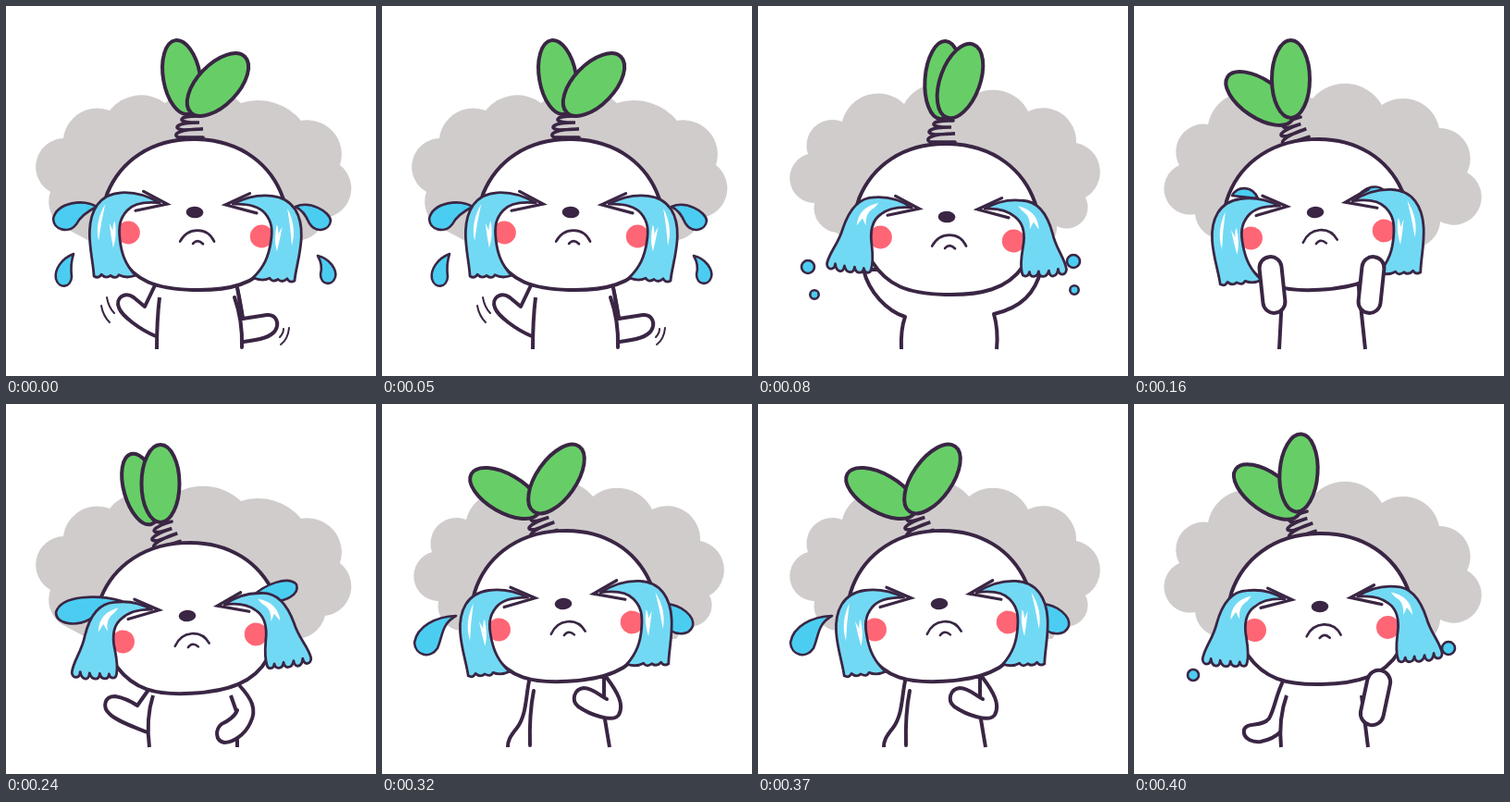
Recreate the animation shown at these times as an HTML page without scripts. Size 400 px wide and 400 px high, loop 0.48 s.

```html
<!DOCTYPE html>
<html lang="en">
<head>
<meta charset="utf-8">
<title>Crying sprout</title>
<style>
html, body { margin: 0; width: 100%; height: 100%; overflow: hidden; background: #fff; }
svg { display: block; width: 100vw; height: 100vh; }
.pose { visibility: hidden; animation: show 480ms step-end infinite; animation-delay: calc(var(--i) * 80ms - 480ms); }
@keyframes show { 0% { visibility: visible; } 16.666%, 100% { visibility: hidden; } }
.ink { fill: #fff; stroke: #3a2644; stroke-width: 4; stroke-linejoin: round; }
.arm { stroke-linecap: round; }
.line { fill: none; stroke: #3a2644; stroke-width: 2.6; stroke-linecap: round; }
.thick { stroke-width: 4; }
.thin { stroke-width: 2; }
.leaf { fill: #67ce67; stroke: #3a2644; stroke-width: 4; }
.drop { fill: #4bcdf2; stroke: #3a2644; stroke-width: 2.6; stroke-linejoin: round; }
.tear { fill: #72d9f4; stroke: #3a2644; stroke-width: 2.8; stroke-linejoin: round; }
.eye { fill: none; stroke: #3a2644; stroke-width: 3.2; stroke-linecap: round; stroke-miterlimit: 10; }
.shine, .body { fill: #fff; }
.cloud { fill: #d0cccc; }
.cheek { fill: #ff6675; }
.nose { fill: #3a2644; }
</style>
</head>
<body>
<svg viewBox="0 0 400 400">
<defs>
  <path id="cloudA" class="cloud" d="M60 238A32 32 0 0 1 48 201A31 31 0 0 1 62 143A37 37 0 0 1 112 113A43 43 0 0 1 172 105A60 60 0 0 1 254 105A60 60 0 0 1 319 124A37 37 0 0 1 361 172A32 32 0 0 1 345 229A34 34 0 0 1 308 254H90Z"/>
  <path id="cloudB" class="cloud" d="M85 245A27 27 0 0 1 61 213A27 27 0 0 1 54 160A28 28 0 0 1 91 125A40 40 0 0 1 158 106A42 42 0 0 1 228 100A42 42 0 0 1 292 114A36 36 0 0 1 344 148A32 32 0 0 1 354 207A23 23 0 0 1 323 238Q324 246 318 254H95Z"/>
  <path id="cloudC" class="cloud" d="M92 252A30 30 0 0 1 66 225A28 28 0 0 1 49 172A30 30 0 0 1 80 128A43 43 0 0 1 150 103A44 44 0 0 1 193 100A46 46 0 0 1 268 107A40 40 0 0 1 330 132A33 33 0 0 1 360 180A30 30 0 0 1 331 233Q330 250 312 260H100Z"/>

  <path id="spring" class="line" style="stroke-width:3.6" d="M11-11C-16-12-14-4 0-4H9C-18-4-20 3-8 4L13 3C-14 3-20 9-14 12H13"/>

  <!-- Head parts are centred on the nose -->
  <g id="head">
    <path class="ink" d="M0-79C50-79 82-52 95-18C104 5 97 34 84 51C68 76 40 84 0 84S-62 76-79 51C-92 34-104 5-95-18C-82-52-50-79 0-79Z"/>
    <circle class="cheek" cx="-71" cy="24" r="12.5"/>
    <circle class="cheek" cx="73" cy="24" r="12.5"/>
    <ellipse class="nose" rx="9.3" ry="6.3"/>
    <path class="line" d="M-15 32C-7 16 14 15 22 31M-1 34Q4 28 10 34"/>
  </g>

  <path id="eye" class="eye" d="M-56-21L-30-8-64 0"/>
  <g id="pour">
    <path class="tear" d="M-38-9C-52-17-68-20-80-19C-104-17-113 2-113 24C-113 42-108 58-107 72q5 3 8-2q5 5 10 1q6 4 9-1q8 4 18 0C-74 58-78 46-80 32C-82 18-81 9-73 0C-66-8-52-10-38-9Z"/>
    <path class="shine" d="M-92 14Q-90 28-87 41Q-83 28-86 12Q-88 15-88 22ZM-97-6Q-108 14-103 34Q-101 14-97-6Z"/>
    <use href="#eye"/>
  </g>
  <g id="flare">
    <path class="tear" d="M-38-9C-52-18-66-20-78-19C-96-19-106-4-112 16C-116 32-126 42-128 54c0 7 8 8 9 0c1 9 9 11 10 2c2 8 10 9 11 1c1 7 9 8 10 1c1 6 7 6 8 1C-77 48-80 36-81 26C-82 12-78 4-71-1C-64-7-52-10-38-9Z"/>
    <path class="shine" d="M-97 12C-96-2-88-10-74-13L-78-8C-84-4-88 0-87 12L-91 4Z"/>
    <use href="#eye"/>
  </g>
  <g id="pours"><use href="#pour"/><use href="#pour" transform="matrix(-1 0 0 1 3 -1)"/></g>
  <g id="flares"><use href="#flare"/><use href="#flare" transform="matrix(-1 0 0 1 3 -1)"/></g>
</defs>

<g class="pose" style="--i:0">
  <use href="#cloudA"/>
  <path class="ink arm" d="M161 302L150 325 138 315C128 308 118 316 122 326C125 335 145 350 162 357"/>
  <path class="ink arm" d="M250 305Q253 318 256 338L282 334C292 333 296 343 291 351C286 358 275 361 257 363"/>
  <path class="body" d="M166 295H248L256 371H163Z"/>
  <path class="ink" fill="none" d="M166 315Q163 340 163 371"/>
  <path class="line thick" d="M247 315Q256 340 255 369M250 305L256 338"/>
  <path class="line thin" d="M103 324Q105 335 112 342M109 315Q111 326 117 332M306 348Q305 360 297 366M300 349Q300 354 296 358"/>
  <use href="#spring" x="200" y="130"/>
  <ellipse class="leaf" rx="20" ry="40.5" transform="translate(190 77) rotate(-10)"/>
  <ellipse class="leaf" rx="22" ry="42" transform="translate(229 85) rotate(44)"/>
  <use href="#head" transform="translate(204 223) rotate(1.6)"/>
  <g class="drop">
    <path d="M98 217C85 208 55 212 51 230C52 243 68 246 76 236C80 228 88 222 98 217Z"/>
    <path d="M313 217C328 210 350 222 351 232C350 243 335 246 328 235Q322 221 313 217Z"/>
    <path d="M73 268C60 273 52 285 54 295C57 306 70 305 71 293C70 285 70 277 73 268Z"/>
    <path d="M337 270C350 273 358 285 356 293C353 303 340 302 340 290C342 283 341 277 337 270Z"/>
  </g>
  <use href="#pours" transform="translate(204 223) rotate(1.6)"/>
</g>

<g class="pose" style="--i:1">
  <use href="#cloudB"/>
  <path class="ink" d="M155 371Q154 350 159 336C140 330 120 310 114 285H306C300 310 285 326 255 333Q260 350 258 371"/>
  <use href="#spring" x="200" y="135"/>
  <ellipse class="leaf" rx="19.5" ry="42" transform="translate(200 80) rotate(4)"/>
  <ellipse class="leaf" rx="21.5" ry="42" transform="translate(218.5 81) rotate(20)"/>
  <use href="#head" transform="translate(204 228) rotate(1.6)"/>
  <use href="#flares" transform="translate(204 228) rotate(1.6)"/>
  <g class="drop">
    <circle cx="54" cy="282" r="7"/><circle cx="61" cy="312" r="4.7"/>
    <circle cx="341" cy="276" r="7"/><circle cx="342" cy="307" r="4.7"/>
  </g>
</g>

<g class="pose" style="--i:2">
  <use href="#cloudC"/>
  <path class="ink" d="M157 371L161 295H242L250 371"/>
  <use href="#spring" transform="translate(173 134) rotate(-18)"/>
  <ellipse class="leaf" rx="42" ry="20.5" transform="translate(136 100) rotate(34)"/>
  <ellipse class="leaf" rx="20.5" ry="42" transform="translate(169.5 79)"/>
  <use href="#head" transform="translate(196 223) rotate(-3.2)"/>
  <path class="drop" d="M106 205C112 194 128 194 134 208ZM241 210C247 194 266 191 272 202Z"/>
  <use href="#pours" transform="translate(196 223) rotate(-3.2)"/>
  <rect class="ink" x="-12" y="-30.5" width="24" height="61" rx="12" transform="translate(149.5 301.5) rotate(-6)"/>
  <rect class="ink" x="-12" y="-30.5" width="24" height="61" rx="12" transform="translate(256.5 301.5) rotate(6)"/>
</g>

<g class="pose" style="--i:3">
  <use href="#cloudA"/>
  <path class="ink arm" d="M154 309L142 326Q130 318 118 316C106 316 104 328 112 335C120 343 138 349 153 355"/>
  <path class="body" d="M159 300H243L251 371H155Z"/>
  <path class="ink" d="M159 315Q151 340 155 371M243 315L250 335M250 358V371"/>
  <path class="ink arm" d="M253 305C265 318 272 330 264 345C258 358 245 366 236 366C226 364 226 352 233 346C240 343 248 337 250 331"/>
  <use href="#spring" transform="translate(172 141) rotate(-18)"/>
  <ellipse class="leaf" rx="18.5" ry="39.5" transform="translate(146 92) rotate(-16)"/>
  <ellipse class="leaf" rx="20.5" ry="42" transform="translate(167 86)"/>
  <use href="#head" transform="translate(196 229) rotate(-3.2)"/>
  <path class="drop" d="M125 213C100 206 60 206 54 225C54 238 75 241 90 233C100 225 115 217 125 213ZM266 208C280 195 305 185 314 195C318 207 300 214 288 213Z"/>
  <use href="#flares" transform="translate(196 229) rotate(-3.2)"/>
</g>

<g class="pose" style="--i:4">
  <use href="#cloudB"/>
  <path class="ink" d="M136 371C136 364 138 360 146 350C157 335 155 315 160 295H240V335L246 371"/>
  <path class="line thick" d="M164 310Q159 335 160 369"/>
  <path class="ink arm" d="M243 296C255 312 262 325 256 336C250 345 225 336 212 327C204 320 208 308 218 307C228 307 235 315 243 319"/>
  <use href="#spring" transform="translate(173 129) rotate(-18)"/>
  <ellipse class="leaf" rx="42" ry="20.5" transform="translate(133 96.5) rotate(30)"/>
  <ellipse class="leaf" rx="21.5" ry="43" transform="translate(188.5 81) rotate(35)"/>
  <use href="#head" transform="translate(196 216) rotate(-3.2)"/>
  <path class="drop" d="M80 229C58 230 38 240 35 258C36 272 52 276 60 264C66 250 64 238 80 229ZM306 216C325 217 338 230 336 240C332 250 320 250 312 245Z"/>
  <use href="#pours" transform="translate(196 216) rotate(-3.2)"/>
</g>

<g class="pose" style="--i:5">
  <use href="#cloudC"/>
  <path class="ink arm" d="M162 298C154 312 152 330 146 340C138 350 122 343 119 352C117 363 130 366 137 365C147 363 155 358 159 354"/>
  <path class="body" d="M163 295H245L253 371H159Z"/>
  <path class="ink" d="M165 315Q156 340 159 371M246 315L253 371"/>
  <use href="#spring" transform="translate(180 130) rotate(-18)"/>
  <ellipse class="leaf" rx="42" ry="20.5" transform="translate(144 95) rotate(36)"/>
  <ellipse class="leaf" rx="20.5" ry="42" transform="translate(178 74.5) rotate(4)"/>
  <use href="#head" transform="translate(201 219) rotate(-1.2)"/>
  <circle class="drop" cx="64" cy="293" r="6"/>
  <circle class="drop" cx="340" cy="264" r="7"/>
  <use href="#flares" transform="translate(201 219) rotate(-1.2)"/>
  <rect class="ink" x="-12.5" y="-30" width="25" height="60" rx="12.5" transform="translate(261 317.5) rotate(12)"/>
</g>
</svg>
</body>
</html>
```
